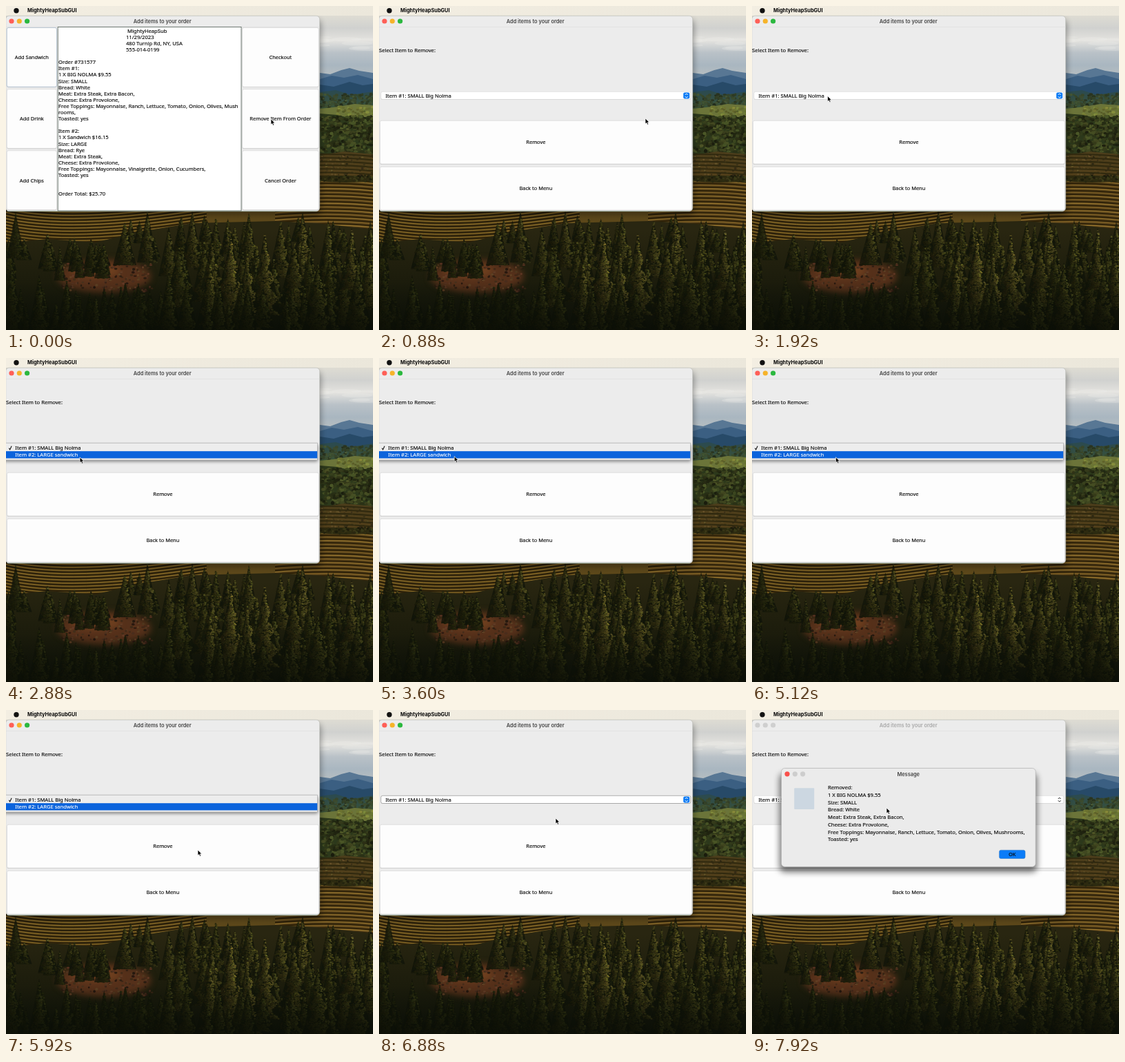
Recreate the animation shown at these times as an HTML page with a canvas. Size 532 by 470 pixels, loop 8 s.

```html
<!DOCTYPE html>
<html lang="en">
<head>
<meta charset="utf-8">
<title>Sandwich order</title>
<style>
html, body { margin: 0; width: 100%; height: 100%; overflow: hidden; background: #14170b; }
canvas, svg { position: absolute; left: 0; top: 0; width: 532px; height: 470px; display: block; }
text { font: 7.62px "Noto Sans", "Open Sans", sans-serif; fill: #080808; stroke: #080808; stroke-width: .14px; }
.btn { font-size: 7.45px; }
.bold { font: 700 7.4px Inter, "Liberation Sans", sans-serif; stroke: none; }
.title { font-weight: 600; fill: #454545; }
.mid { text-anchor: middle; }
.lit { fill: #fff; stroke: #fff; }
</style>
</head>
<body>
<canvas id="desk" width="532" height="470"></canvas>
<svg id="ui" viewBox="0 0 532 470" xmlns="http://www.w3.org/2000/svg"></svg>
<script>
const start = performance.now();
const c = document.getElementById('desk').getContext('2d');

// ---------- desktop landscape ----------
let seed = 41;
const rnd = () => (seed = (seed * 16807) % 2147483647) / 2147483647;
const between = (a, b) => a + (b - a) * rnd();

function fade(y0, y1, ...stops) {
  const g = c.createLinearGradient(0, y0, 0, y1);
  stops.forEach((s, i) => g.addColorStop(i / (stops.length - 1), s));
  return g;
}
function ridge(fill, ...pts) {
  c.fillStyle = fill;
  c.beginPath();
  c.moveTo(-5, 470);
  c.lineTo(-5, pts[1]);
  for (let i = 0; i < pts.length; i += 2) c.lineTo(pts[i], pts[i + 1]);
  c.lineTo(540, pts[pts.length - 1]);
  c.lineTo(540, 470);
  c.fill();
}
function dab(x, y, rx, ry, fill) {
  c.fillStyle = fill;
  c.beginPath();
  c.ellipse(x, y, rx, ry, 0, 0, 7);
  c.fill();
}
function scatter(n, x0, x1, y0, y1, r, hue, sat, lo, hi) {
  for (let i = 0; i < n; i++)
    dab(between(x0, x1), between(y0, y1), between(.5, 1) * r, between(.4, .8) * r,
      `hsl(${hue + between(-6, 6)} ${sat}% ${between(lo, hi)}%)`);
}
function conifer(x, top, h, w, sun) {
  const n = h * w / 6;
  c.fillStyle = 'rgba(15,19,9,.75)';
  c.beginPath();
  c.moveTo(x, top);
  c.lineTo(x + w * .5, top + h);
  c.lineTo(x - w * .5, top + h);
  c.fill();
  for (let i = 0; i < n; i++) {
    const v = Math.sqrt(rnd()), u = between(-1, 1);
    const edge = w * .5 * v * (.75 + .25 * Math.sin(v * 26));
    const light = 6 + sun * (.55 + .45 * u) * (1 - v * .65) * between(.4, 1.15);
    dab(x + u * edge, top + v * h, between(.7, 1.9), between(.5, 1.3),
      `hsl(${between(47, 60) + (1 - sun / 30) * 18} ${between(38, 52)}% ${light}%)`);
  }
}

c.fillStyle = fade(14, 104, '#dedcd3', '#d0d1cf', '#e4e3df', '#b9c1c7', '#a9b6c0', '#b9c0c1');
c.fillRect(0, 0, 532, 110);
for (let i = 0; i < 9; i++)
  dab(between(450, 535), between(42, 62), between(10, 26), between(1, 4), 'rgba(238,237,232,.28)');
ridge('#587794', 455, 97, 470, 99, 486, 93, 498, 90, 512, 94, 532, 97);
ridge('#3b5f82', 455, 106, 472, 101, 490, 104, 510, 100, 532, 106);
ridge('#274a68', 455, 114, 475, 117, 498, 110, 517, 115, 532, 113);
ridge(fade(123, 150, '#2b4a50', '#3c5235'), 455, 125, 478, 122, 500, 129, 532, 124);
scatter(140, 455, 534, 128, 147, 3, 92, 24, 14, 28);
ridge('#6b7439', 455, 149, 484, 146, 505, 142, 532, 144);
scatter(60, 480, 534, 146, 160, 3, 66, 40, 25, 42);
ridge('#2c381b', 455, 156, 480, 158, 500, 163, 532, 160);
scatter(430, 454, 534, 160, 212, 3.6, 72, 38, 8, 25);
ridge(fade(210, 300, '#4b3d1b', '#54401a', '#5c451c'), 455, 217, 490, 211, 532, 215);
scatter(110, 455, 534, 214, 250, 2, 43, 42, 12, 31);

c.lineCap = 'round';
for (let i = 0; i < 24; i++) {
  const y = 216 + i * 5.3;
  c.strokeStyle = i < 7 ? '#30290f' : '#302309';
  c.lineWidth = 2.1;
  c.beginPath();
  c.moveTo(380, y + 3);
  c.quadraticCurveTo(470, y - 5, 540, y + 3);
  c.stroke();
  if (i > 6) {
    c.strokeStyle = i % 2 ? '#9a782f' : '#846426';
    c.lineWidth = 1.1;
    c.beginPath();
    c.moveTo(380, y + 5.2);
    c.quadraticCurveTo(470, y - 2.8, 540, y + 5.2);
    c.stroke();
  }
}
dab(493, 251, 46, 5, '#2d2a10');
scatter(70, 454, 534, 246, 255, 2.5, 58, 42, 7, 18);

c.fillStyle = fade(298, 350, '#66501f', '#46350f');
c.fillRect(0, 297, 390, 80);
for (let i = 0; i < 17; i++) {
  const y = 286 + i * 4.6;
  for (const [shift, color, wide] of [[0, '#2b200a', 2.1], [2.1, '#90702b', 1]]) {
    c.strokeStyle = color;
    c.lineWidth = wide;
    c.beginPath();
    c.moveTo(-5, y + shift - 4);
    c.quadraticCurveTo(90, y + shift + 20, 290, y + shift - 12);
    c.stroke();
  }
}

// forest floor, bare soil, then trees from back to front
ridge(fade(325, 470, '#292611', '#1c1c0c', '#10140a'),
  0, 344, 60, 338, 130, 343, 190, 328, 270, 315, 390, 312, 450, 315, 532, 324);
c.save();
c.filter = 'blur(5px)';
dab(142, 392, 68, 24, '#55301a');
dab(130, 384, 36, 10, '#70401f');
c.restore();
scatter(150, 82, 212, 372, 414, 2.4, 25, 45, 9, 27);

for (let i = 0; i < 46; i++) {
  const x = between(-10, 540), left = x < 150;
  conifer(x, left ? between(335, 352) : between(303, 340), between(30, 52), between(14, 24), left ? 15 : between(14, 26));
}
[[14, 300, 66, 26, 13], [60, 330, 50, 26, 19], [172, 314, 62, 34, 23], [205, 298, 74, 30, 25],
 [236, 320, 72, 30, 23], [270, 297, 82, 32, 26], [304, 308, 74, 30, 22], [352, 300, 92, 34, 24],
 [398, 312, 82, 36, 27], [430, 299, 105, 42, 30], [467, 310, 94, 36, 24], [501, 322, 88, 34, 27],
 [528, 312, 98, 38, 22]].forEach(t => conifer(...t));
for (let i = 0; i < 34; i++) {
  const x = between(220, 540);
  conifer(x, between(340, 382), between(60, 88), between(26, 40), between(15, 27));
}
[[326, 337, 130, 58, 30], [375, 330, 118, 46, 28], [296, 372, 90, 38, 25], [350, 360, 110, 46, 27]]
  .forEach(t => conifer(...t));
for (let i = 0; i < 50; i++) {
  const x = between(-10, 545);
  conifer(x, between(398, 434), between(55, 90), between(24, 40), x > 230 ? between(8, 17) : between(4, 11));
}
[[8, 372, 100, 34, 10], [48, 390, 90, 34, 11], [88, 398, 80, 34, 10], [236, 384, 95, 36, 14], [262, 398, 80, 34, 13],
 [452, 372, 105, 46, 18], [510, 378, 100, 44, 17]].forEach(t => conifer(...t));
c.fillStyle = fade(400, 470, 'rgba(8,11,5,0)', 'rgba(8,11,5,.62)');
c.fillRect(0, 400, 532, 70);

// ---------- interface ----------
const text = (x, y, s, cls = '', more = '') => `<text x="${x}" y="${y}" class="${cls}" ${more}>${s}</text>`;
const rect = (x, y, w, h, r, fill, more = '') =>
  `<rect x="${x}" y="${y}" width="${w}" height="${h}" rx="${r}" fill="${fill}" ${more}/>`;
const dot = (x, y, r, fill) => `<circle cx="${x}" cy="${y}" r="${r}" fill="${fill}"/>`;
const group = (id, ...parts) => `<g id="${id}">${parts.join('')}</g>`;
const edge = (color, w = .6) => `stroke="${color}" stroke-width="${w}"`;
const button = (x, y, w, h, s, line = '#cfcfcf') =>
  rect(x, y + .7, w, h, 2.5, '#c4c4c4') + rect(x, y, w, h, 2.5, '#fdfdfd', edge(line)) +
  text(x + w / 2, y + h / 2 + 2.7, s, 'btn mid');
const lights = (x, y, ...fills) => fills.map((f, i) => dot(x + i * 11.3, y, 3.6, f)).join('');
const lines = (x, y, step, list) => list.map((s, i) => s ? text(x, (y + i * step).toFixed(2), s) : '').join('');
const arrows = color =>
  `<path d="M443.8 129l1.9-2 1.9 2M443.8 131.2l1.9 2 1.9-2" fill="none" ${edge(color, 1)}/>`;

const small = ['1 X BIG NOLMA $9.55', 'Size: SMALL', 'Bread: White', 'Meat: Extra Steak, Extra Bacon,', 'Cheese: Extra Provolone,'];
const toppings = 'Free Toppings: Mayonnaise, Ranch, Lettuce, Tomato, Onion, Olives, Mush';
const receipt = ['Order #731577', 'Item #1:', ...small, toppings, 'rooms,', 'Toasted: yes', '',
  'Item #2:', '1 X Sandwich $16.15', 'Size: LARGE', 'Bread: Rye', 'Meat: Extra Steak,', 'Cheese: Extra Provolone,',
  'Free Toppings: Mayonnaise, Vinaigrette, Onion, Cucumbers,', 'Toasted: yes', '', '', 'Order Total: $25.70'];
const choices = ['Item #1: SMALL Big Nolma', 'Item #2: LARGE sandwich'];

const row = i => text(13.3, 133.1 + i * 10.2, choices[i], '', `id="row${i}"`);

document.getElementById('ui').innerHTML = `
<defs>
  <filter id="soft" x="-20%" y="-20%" width="140%" height="150%"><feGaussianBlur stdDeviation="5"/></filter>
  <filter id="thin" x="-5%" y="-40%" width="110%" height="200%"><feGaussianBlur stdDeviation="2"/></filter>
  <linearGradient id="bar"><stop stop-color="#f3eee2"/><stop offset="1" stop-color="#ebe7db"/></linearGradient>
  <clipPath id="stage"><rect y="14" width="532" height="456"/></clipPath>
</defs>` +
group('menu', rect(0, 0, 532, 14, 0, 'url(#bar)'), dot(15, 6.8, 3.7, '#111'),
  text(31, 9.4, 'MightyHeapSubGUI', 'bold')) +
`<g clip-path="url(#stage)">` +
rect(-4, 20, 460, 284, 6, '#000', 'opacity=".38" filter="url(#soft)"') + '</g>' +
group('frame', rect(-.3, 14.2, 455, 283.6, 5, '#ececec', edge('#b5b8b0')),
  rect(2, 297, 449, .8, 0, '#a9bfae'),
  rect(0, 29.9, 454.5, .6, 0, '#dcdcdc'),
  `<g id="on">${lights(8, 22, '#fe5f57', '#f6b32a', '#2bb83f')}</g>`,
  `<g id="off">${lights(8, 22, '#cfcfcf', '#cfcfcf', '#cfcfcf')}</g>`,
  text(226.7, 24.6, 'Add items to your order', 'bold title mid', 'id="caption"')) +
group('order',
  button(1.2, 31.4, 72.3, 86, 'Add Sandwich', '#8fa6bd'),
  button(1.2, 120.6, 72.3, 86, 'Add Drink'),
  button(1.2, 209.8, 72.3, 86, 'Add Chips'),
  button(342.5, 31.4, 110.8, 86, 'Checkout'),
  button(342.5, 120.6, 110.8, 86, 'Remove Item From Order'),
  button(342.5, 209.8, 110.8, 86, 'Cancel Order'),
  rect(75.2, 30.4, 265.8, 266.6, 0, '#fff', edge('#5d6a62', .9)),
  text(176, 38.7, 'MightyHeapSub'),
  lines(174, 47.8, 9.1, ['11/29/2023', '480 Turnip Rd, NY, USA', '555-014-0199']),
  lines(76, 84.2, 9.1, receipt)) +
group('remove',
  text(0, 66.6, 'Select Item to Remove:'),
  rect(2.8, 124.9, 449, 11.2, 2.5, '#c6c6c6'),
  rect(2.8, 124.3, 449, 11.2, 2.5, '#fff', 'id="combo" stroke="#d6d6d6" stroke-width=".6"'),
  text(9.5, 133.1, choices[0]),
  `<g id="blue">${rect(441.2, 125.4, 9, 9, 2, '#0a7bf5')}${arrows('#fff')}</g>`,
  `<g id="plain">${arrows('#222')}</g>`,
  button(1.4, 166.2, 452, 63, 'Remove'),
  button(1.4, 233.2, 452, 63, 'Back to Menu')) +
group('popup',
  rect(-4, 126, 456, 24.5, 2, '#000', 'opacity=".4" filter="url(#thin)"'),
  rect(-2, 123.2, 453.4, 24.8, 0, '#ededed', edge('#a4a4a4')),
  rect(0, 125, 451.2, 10.3, 0, '#0b63dc', 'id="hover"'),
  `<path id="tick" d="M4.3 130.8l1.4 2.1 2.4-5.2" fill="none" stroke-width="1.1"/>`,
  row(0), row(1)) +
group('dialog',
  rect(40, 92, 373, 143, 7, '#000', 'opacity=".55" filter="url(#soft)"'),
  rect(42.5, 84.5, 368.7, 143, 5, '#ebebeb', edge('#a8a8a8')),
  lights(51, 92.8, '#f9504b', '#cdcdcd', '#cdcdcd'),
  text(226.7, 95.5, 'Message', 'bold title mid'),
  rect(61.2, 113.3, 29, 30.8, 1, '#ccd7e1'),
  lines(110, 115, 10.77, ['Removed:', ...small, toppings + 'rooms,', 'Toasted: yes']),
  rect(358.4, 203.3, 37.6, 12.2, 2.5, '#0b7cf8', edge('#3f83c8')),
  text(377.2, 212, 'OK', 'btn mid')) +
`<path id="arrow" d="M0 0V8L1.9 6.4 3.1 9.2 4.6 8.6 3.4 5.8H5.9Z" fill="#000" stroke="#fff" stroke-width=".7"/>`;

// ---------- motion ----------
const LOOP = 8000, TICK = 80;
const screens = [[0, 'order'], [480, 'remove'], [2240, 'popup'], [6080, 'remove'], [7440, 'dialog']];
const hovered = [[0, 0], [2640, 1], [3920, 0], [4560, 1]];
const path = [[0, 384, 164], [480, 386, 163], [1040, 386, 163], [2000, 104, 130], [2320, 104, 131],
  [2800, 107, 144], [3520, 109, 143], [4160, 114, 135], [4400, 114, 135], [4800, 116, 143], [5200, 122, 144],
  [5840, 278, 203], [6160, 278, 203], [6800, 256, 157], [6960, 256, 157], [7200, 258, 175],
  [7440, 258, 175], [7840, 195, 142], [8000, 195, 142]];

const el = id => document.getElementById(id);
const show = (id, on) => el(id).style.display = on ? '' : 'none';
const current = (table, t) => table.filter(r => r[0] <= t).pop()[1];

function pointer(t) {
  const i = path.findIndex(p => p[0] > t);
  const [t0, x0, y0] = path[i - 1], [t1, x1, y1] = path[i];
  const k = (t - t0) / (t1 - t0), e = k * k * (3 - 2 * k);
  return [x0 + (x1 - x0) * e, y0 + (y1 - y0) * e];
}

function draw(now) {
  const t = Math.floor(Math.max(0, now - start) % LOOP / TICK) * TICK;
  const view = current(screens, t), hot = current(hovered, t), modal = view === 'dialog';
  show('order', view === 'order');
  show('remove', view !== 'order');
  show('popup', view === 'popup');
  show('dialog', modal);
  show('on', !modal);
  show('off', modal);
  show('blue', !modal);
  show('plain', modal);
  el('caption').style.fill = modal ? '#a9a9a9' : '';
  el('combo').setAttribute('stroke', t >= 6080 && !modal ? '#808080' : '#d6d6d6');
  el('hover').setAttribute('y', 125 + hot * 10.2);
  [0, 1].forEach(i => el('row' + i).setAttribute('class', i === hot ? 'lit' : ''));
  el('tick').setAttribute('stroke', hot ? '#111' : '#fff');
  el('arrow').setAttribute('transform', `translate(${pointer(t).map(v => v.toFixed(1))})`);
}
function loop(now) {
  draw(now);
  requestAnimationFrame(loop);
}
draw(start);
requestAnimationFrame(loop);
</script>
</body>
</html>
```
